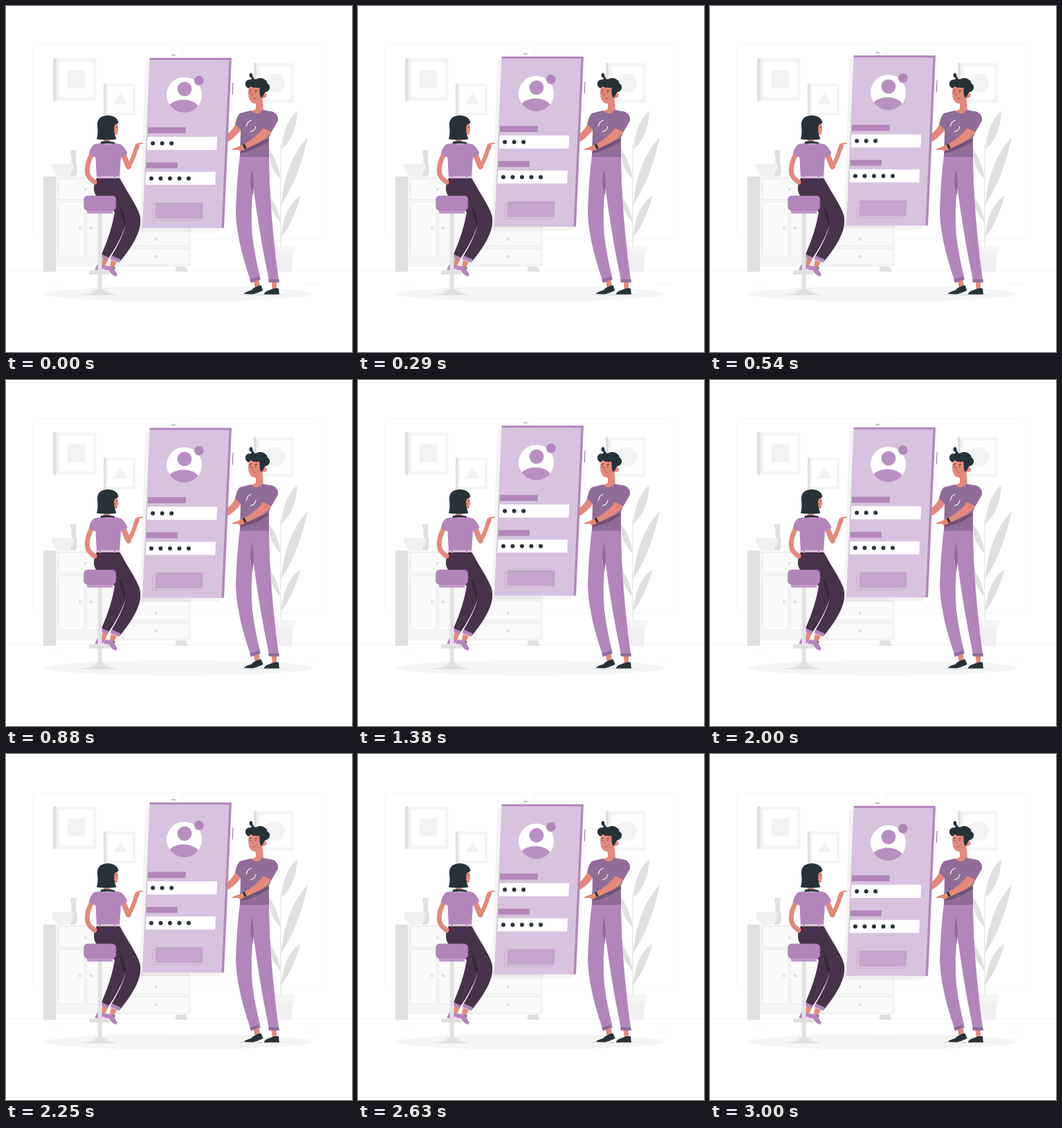
Write an HTML page that moves like this. It is 500 px wide and 500 px high and loops after 3.04 s.

```html
<!DOCTYPE html>
<html lang="en">
<head>
<meta charset="utf-8">
<title>Sign in</title>
<style>
  html, body { margin: 0; width: 100%; height: 100%; overflow: hidden; background: #fff; }
  svg { display: block; width: 100vw; height: 100vh; }
  :root { --purple: #b286bb; --face: #d7c3dd; --tee: #906c98; --dark: #263238; --skin: #e4897b; --pants: #473349; }
  .p { fill: var(--purple); }
  .f { fill: var(--face); }
  .t { fill: var(--tee); }
  .d { fill: var(--dark); }
  .s { fill: var(--skin); }
  .j { fill: var(--pants); }
  .w { fill: #fff; }
  .g0 { fill: #fafafa; }
  .g1 { fill: #f5f5f5; }
  .g2 { fill: #f0f0f0; }
  .g3 { fill: #e0e0e0; }
  .arm { fill: none; stroke: var(--skin); stroke-linecap: round; stroke-linejoin: round; }
  /* steady rise and fall, with a short rest at the bottom */
  @keyframes float {
    0%, 98.68%, 100% { transform: translateY(0); }
    49.34% { transform: translateY(-10px); }
  }
  .panel { animation: float 3040ms linear infinite; }
</style>
</head>
<body>
<svg viewBox="0 0 500 500">
  <!-- room -->
  <g fill="none" stroke="#f4f4f4" stroke-width=".8">
    <rect x="38.500" y="55.500" width="204" height="282" rx="4"/>
    <rect x="254.500" y="55.500" width="203" height="282" rx="4"/>
    <path stroke="#f0f0f0" d="M0 382.400H500"/>
    <path d="M65 398H80M430 402H454"/>
  </g>
  <ellipse class="g1" cx="249.500" cy="416" rx="194" ry="11"/>

  <!-- pictures -->
  <path class="g1" d="M68 75.500H130.500V137H68ZM141 112H187V158H141ZM358 82.500H416V140H358Z"/>
  <path class="g3" d="M68 75.500H73V137H68ZM141 112H144.500V158H141ZM358 82.500H362V140H358Z"/>
  <path class="w" d="M77.500 80.500H126V132H77.500ZM147.500 116H183.500V154H147.500ZM366.500 87.500H411.500V135H366.500Z"/>
  <g fill="#f3f3f3">
    <path d="M89 93H114V119H89ZM166 125L175.500 142H156Z"/>
    <circle cx="389" cy="111" r="14"/>
  </g>

  <!-- cabinet -->
  <path class="g3" d="M54 246.500H72V384H54ZM245 376.500H260L263 384H245Z"/>
  <path class="g1" d="M72 246.500H170V312H267V376.500H72Z"/>
  <g class="g0" stroke="#e8e8e8" stroke-width=".8">
    <path d="M75.500 249.500H155V279.500H75.500ZM75.500 283H113V361.500H75.500ZM116.500 283H154V361.500H116.500Z"/>
    <path d="M170 319.500H264.500V346.500H170ZM170 351H264.500V374H170Z"/>
  </g>
  <g class="g3">
    <circle cx="115" cy="265" r="2.200"/><circle cx="107" cy="320.500" r="2.200"/><circle cx="123" cy="320.500" r="2.200"/>
    <circle cx="217" cy="337" r="2.200"/><circle cx="217" cy="362" r="2.200"/>
    <path d="M93 208H102Q100 220 102 229Q105 246 98 246.500H92Q97 230 93 208Z"/>
  </g>
  <path class="g2" d="M66.500 228.500H98Q98 241 89 246.500H76Q66.500 241 66.500 228.500Z"/>

  <!-- plant -->
  <path class="g3" d="M421 152Q401 168 398 207Q419 190 421 152ZM436 189.500Q404 222 397 289Q423 250 436 189.500ZM425.500 274Q402 289 397 335Q415 313 425.500 274ZM376 203Q392 219 397 250Q383 240 376 203ZM376 269Q392 284 397 313Q383 300 376 269Z"/>
  <path d="M397.500 200Q396 270 397 348" fill="none" stroke="#e0e0e0"/>
  <path class="g2" d="M390 355H415L412.500 384H393Z"/>
  <path class="g1" d="M388 347H418L417 357.500H389Z"/>

  <!-- far arm of the standing figure -->
  <path class="s" d="M333 168L341 177Q331 191 319 197L312 192L320 185Q328 179 333 168Z"/>

  <g class="panel">
    <path fill="#000" opacity=".045" d="M201.500 80H319L308 326.500H192.500Z"/>
    <path class="p" d="M207.700 75H326L315 320.700H300L311 78.300H207.500Z"/>
    <path class="f" d="M207.500 78.300H322.500L311.500 320.700H197Z"/>
    <path d="M239 71H245M328 111L327.300 128.500" stroke="#85808c" stroke-width="1.100"/>
    <clipPath id="disc"><circle cx="257.600" cy="128.500" r="25.600"/></clipPath>
    <g clip-path="url(#disc)">
      <path class="w" d="M230 100H286V156H230Z"/>
      <ellipse fill="#b88fc1" cx="256.500" cy="152" rx="24" ry="16.500"/>
    </g>
    <circle fill="#b88fc1" cx="258" cy="119.800" r="10.400"/>
    <circle class="p" cx="278.800" cy="107.800" r="6.900"/>
    <path class="p" d="M205.300 175.300H260L259.500 184H204.900ZM203 226H248L247.600 234.600H202.500Z"/>
    <path class="w" d="M204.600 189H305.200L304.400 208H203.700ZM202.300 239.700H303L302.200 258.500H201.500Z"/>
    <g class="d">
      <circle cx="212.200" cy="198.400" r="3"/><circle cx="225.700" cy="198.400" r="3"/><circle cx="239.200" cy="198.400" r="3"/>
      <circle cx="210" cy="249.200" r="3"/><circle cx="223.500" cy="249.200" r="3"/><circle cx="237" cy="249.200" r="3"/>
      <circle cx="250.500" cy="249.200" r="3"/><circle cx="264" cy="249.200" r="3"/>
    </g>
    <path fill="#c2a2ca" d="M216.500 284.200H284.500L283.500 307H215.500Z"/>
    <path fill="#c6a5ce" d="M216.300 287.300H281.300L280.500 307H215.500Z"/>
    <path d="M212.800 287.300H281.300L280.300 309.500H211.800Z" fill="none" stroke="#c0a4c8" stroke-width=".6"/>
  </g>

  <!-- stool foot -->
  <ellipse class="g3" cx="135" cy="417" rx="27" ry="1.200"/>
  <path class="g3" d="M116 417Q131 413 133 407H138.500Q141 413 156 417Z"/>

  <!-- seated figure -->
  <g>
    <path class="s" d="M140 363L147 366L143 377L137 376ZM152 367L160 370L156 378L150 376Z"/>
    <path class="p" d="M134 372L140 374L143 377L139 381.500H128.500Q130 375 134 372Z"/>
    <path class="j" d="M140 275L165 282Q174 295 172.500 318Q163 344 148 364.500L138 359Q153 325 157 298Z"/>
    <path class="j" d="M131 249H164.500Q169 257 176 269Q186 285 191.500 297Q196.500 308 192.500 323Q187 342 165 369L152 362Q167 338 172.500 318Q172 301 164 293Q158 286 152 278H133Q127 271 127 264Q127 256 131 249Z"/>
    <path fill="#352538" d="M164 289Q173 298 172.500 318Q166 306 164 289Z"/>
    <path class="p" d="M138.500 359L149 363.500L147 367.500L136.500 363ZM153 360.500L166 366.500L163.500 371L150.500 365.500Z"/>
    <path class="arm" stroke-width="7" d="M123.500 215Q115.500 231 117.800 242Q119.500 249 128 254.500"/>
    <path class="arm" stroke-width="8" d="M169 213Q173 224 177 232"/>
    <path class="arm" stroke-width="6" d="M177 232Q184 221 188 206"/>
    <path class="s" d="M184.500 207L187 200Q190 197 198 197.600L198 199L192.500 200Q194 204 190 208Z"/>
    <path class="s" d="M141 189H150V199H141Z"/>
    <path class="p" d="M137 198Q147 201 157 198L166 200Q172 204 175.500 213L166 219L164 249H131L129.500 219L119.500 214Q122 204 127 200Z"/>
    <path class="d" d="M137 196Q147 194 157 197V199Q147 198 137 199Z"/>
    <path class="f" d="M131.500 245.800H164V249H131.500Z"/>
    <path class="p" d="M135 245.500H137V250H135ZM156 245.500H158V250H156Z"/>
    <path class="s" d="M153 168H161L161.500 176L162.500 180L161 181V185Q159 187 154 185Z"/>
    <path class="d" d="M131 192.500Q133.500 184 132 173Q131 159 147 158Q160 158 162.800 168.500Q160 171 157 171.500Q154.500 180 159.500 192.500Q146 194.500 131 192.500Z"/>
    <path d="M160.500 174V176" stroke="#263238"/>
  </g>

  <!-- stool -->
  <path fill="#e2e2e2" d="M132.700 298H138.600V411H132.700Z"/>
  <rect fill="#c09ac8" x="117" y="293" width="37.500" height="7" rx="2"/>
  <rect x="112.800" y="274.500" width="46" height="20.700" rx="5" class="p" stroke="#a377ac" stroke-width=".7"/>
  <rect class="g3" x="120" y="382" width="30.500" height="6" rx="2"/>
  <path class="p" d="M143.500 375L150 376L156 377Q157 383 161 388L159 391Q152 389 149 382L141 381Z"/>
  <path d="M154 377L158 379M155 380L158 377.500" stroke="#473349" stroke-width=".7"/>

  <!-- standing figure -->
  <g>
    <ellipse class="g3" cx="369" cy="417" rx="35" ry="1.200"/>
    <path class="s" d="M357 394L365 392L367 405L360 407ZM383.500 397H391V410H385Z"/>
    <path class="d" d="M344 416Q345 413.500 354 411Q359 405 368.500 403.500L371.500 411Q362 415.500 356 416.500ZM373 416.700Q373 413 381 410.500Q387 407 394 408L395 416.700Z"/>
    <path class="p" d="M338 216H380Q381 300 394 395L380 396Q366 330 357.500 262Q353 297 356 333Q360 363 367 391L353 396Q333 338 332 297Q333.500 250 338 216Z"/>
    <path class="t" d="M356 235Q350 253 357 274L358 258Z"/>
    <path class="t" d="M352 395.500L366 390.500L368 395L354 400ZM379 395H394.500L395 399.500H380Z"/>
    <path d="M377 225Q379 310 388 390" fill="none" stroke="#a77bb0" stroke-width=".6"/>
    <path class="s" d="M361 137H371L372 152Q362 160 354 152L361 149Z"/>
    <path class="t" d="M354 151Q363 160 371 150L386 153Q394 157 393 165L383 183L380 190V218H338L339 179L331 171Q334 158 338 155Z"/>
    <path fill="#755279" d="M339 210L380 191V195Q363 207 339 213Z"/>
    <path class="s" d="M372 176L383 182Q377 192 366 197L347 206L343 200Q361 191 372 176Z"/>
    <path class="s" d="M347 200L339 202L327 206.500V208L336 208Q336 211 341 209L348 205Z"/>
    <path d="M343.500 199.500L346 206" stroke="#263238" stroke-width="3.200"/>
    <path class="t" d="M376 152L386 153Q394 157 393 166L384 181L370 176Z"/>
    <path d="M347.500 174Q348 167 354.500 165M353 181.500Q360 181 361 173.500" fill="none" stroke="#fff" stroke-width="1.200"/>
    <path class="s" d="M351 116L371 114L372 127Q377 125 377 129Q376 133.500 371 133Q370 141.500 361 141.500Q352.500 140 351 133L350 126Z"/>
    <path class="d" d="M350 119Q345 116 346 111Q347 107 351 106.500Q356 106.500 354.500 103.500Q350.500 103 352 98Q354 96 356.500 98.500Q355.500 100 357 102Q358 106 361 106Q369 101.500 375 107Q378 109 377.500 112Q382 114 381 119Q380 123 376.500 124Q373 125 371 131L368 132.500Q366 127 366.500 118Q358 119 353 116Q352 118 350 119Z"/>
    <g fill="none" stroke="#263238" stroke-width=".9">
      <path d="M351.500 122.500L354.500 121.500M359.500 122.500L363 122"/>
      <path d="M353.800 124.500V126.500M361 124V126"/>
      <path stroke="#b85f55" stroke-width=".7" d="M356.500 126L355.500 130H357.500"/>
      <path stroke="#8c433d" stroke-width=".7" d="M357 133.500Q359.500 134.500 361.500 132.500"/>
    </g>
  </g>
</svg>
</body>
</html>
```
